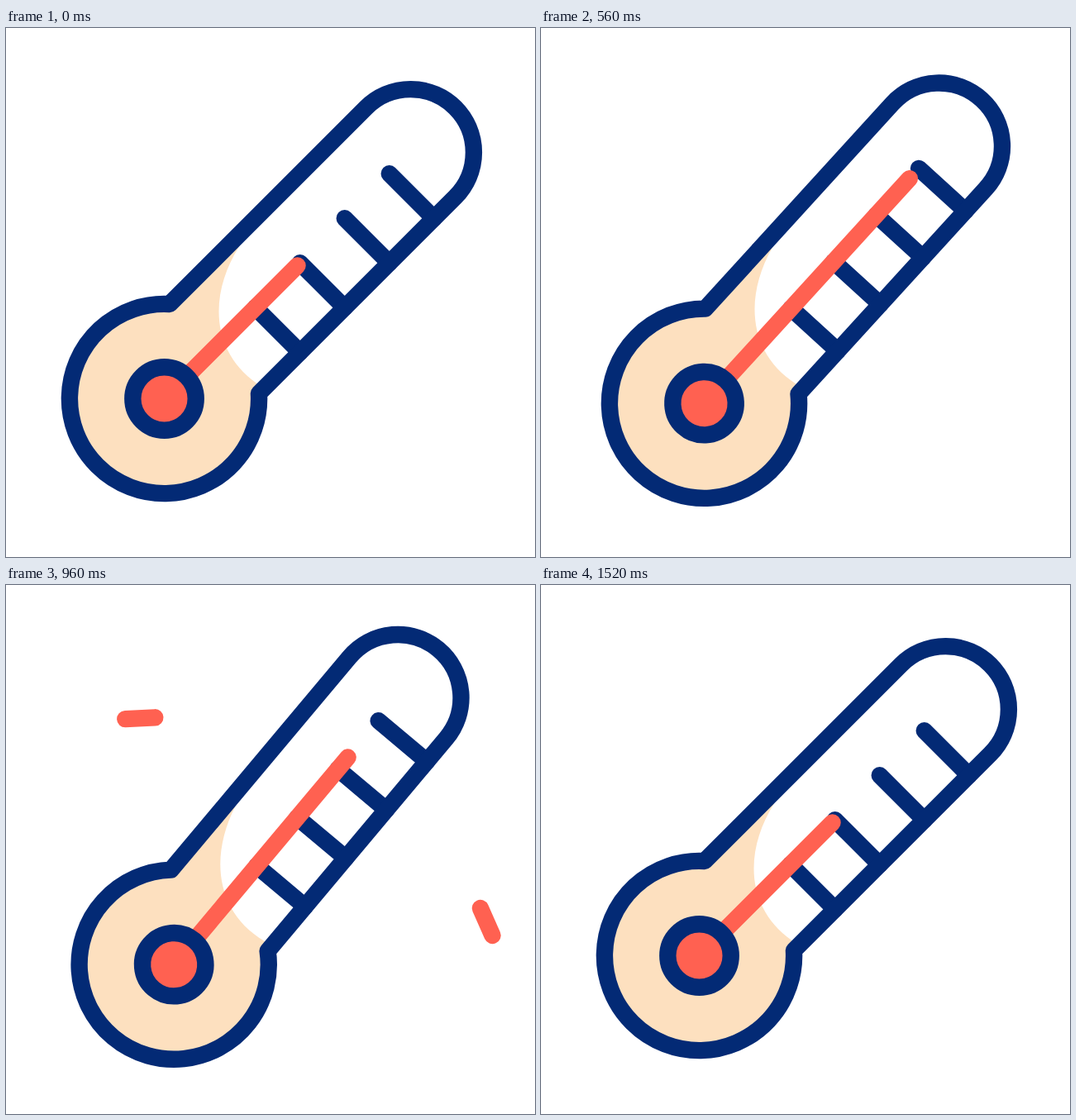
Write an HTML page that moves like this. It is 640 px wide and 640 px high and loops after 2 s.

```html
<!DOCTYPE html>
<html lang="en">
<head>
<meta charset="utf-8">
<title>Thermometer</title>
<style>
  html, body { margin: 0; width: 100%; height: 100%; overflow: hidden; background: #fff; }
  svg { display: block; width: 100vw; height: 100vh; }
  .line { fill: none; stroke: #032a75; stroke-width: 20.4; stroke-linecap: round; stroke-linejoin: round; }
  .red { stroke: #ff6151; }
</style>
</head>
<body>
<svg viewBox="-320 -320 640 640">
  <g id="swing">
    <path id="dashA" class="line red"/>
    <path id="dashB" class="line red"/>
    <g transform="rotate(45)">
      <path fill="#fde0bf" d="M-76.4 96.3V-30L-66-12C-52 50-5 101.5 66 89.5L76.4 87V96.3A114.6 114.6 0 1 1-76.4 96.3Z"/>
      <path class="line" d="M0-203.3H76.4M0-126.9H76.4M0-50.5H76.4M0 25.9H76.4"/>
      <path class="line" d="M-76.4 96.3V-239.7A76.4 76.4 0 0 1 76.4-239.7V96.3A114.6 114.6 0 1 1-76.4 96.3Z"/>
      <path id="level" class="line red"/>
      <circle class="line" cy="181.7" r="38.2" style="fill:#ff6151"/>
    </g>
  </g>
</svg>
<script>
const LOOP = 2000, STEP = 40;

// [time in ms, value]
const ANGLE = [[0, 0], [400, -25], [680, 10], [960, -5], [1320, 2], [1520, 0]];
const LEVEL = [[0, 46], [480, 204], [680, 148], [920, 148], [1240, 46]];

const DASHES = [
  { id: 'dashA', from: [15.6, -165.9], to: [-166.3, -172.8] },
  { id: 'dashB', from: [201.2, -40.5], to: [260, 131.7] }
];

const el = id => document.getElementById(id);
const clamp = x => Math.min(1, Math.max(0, x));
const mix = (a, b, k) => a + (b - a) * k;

// cubic-bezier(.5, 0, .5, 1)
function ease(x) {
  let lo = 0, hi = 1;
  for (let i = 0; i < 24; i++) {
    const s = (lo + hi) / 2;
    if (1.5 * s * (1 - s) + s ** 3 < x) lo = s; else hi = s;
  }
  return lo * lo * (3 - 2 * lo);
}

const easeOut = (t, start, end, power) =>
  1 - (1 - clamp((t - start) / (end - start))) ** power;

function valueAt(keys, t) {
  const i = keys.findIndex(key => key[0] > t);
  if (i < 0) return keys[keys.length - 1][1];
  const [t0, a] = keys[i - 1], [t1, b] = keys[i];
  return mix(a, b, ease((t - t0) / (t1 - t0)));
}

function draw(t) {
  el('swing').setAttribute('transform', `rotate(${valueAt(ANGLE, t)})`);
  el('level').setAttribute('d', `M0 181.7V${-valueAt(LEVEL, t)}`);

  const head = easeOut(t, 560, 1000, 1.5);
  const tail = easeOut(t, 660, 1100, 1.3);
  for (const { id, from, to } of DASHES) {
    const at = k => `${mix(from[0], to[0], k)} ${mix(from[1], to[1], k)}`;
    el(id).setAttribute('d', `M${at(tail)}L${at(head)}`);
    el(id).style.display = head - tail > 0.001 ? '' : 'none';
  }
}

const start = performance.now();
function tick() {
  // 25 steps a second, with a little slack for timer jitter
  const t = performance.now() - start + 4;
  draw(Math.floor(t / STEP) * STEP % LOOP);
  requestAnimationFrame(tick);
}
tick();
</script>
</body>
</html>
```
